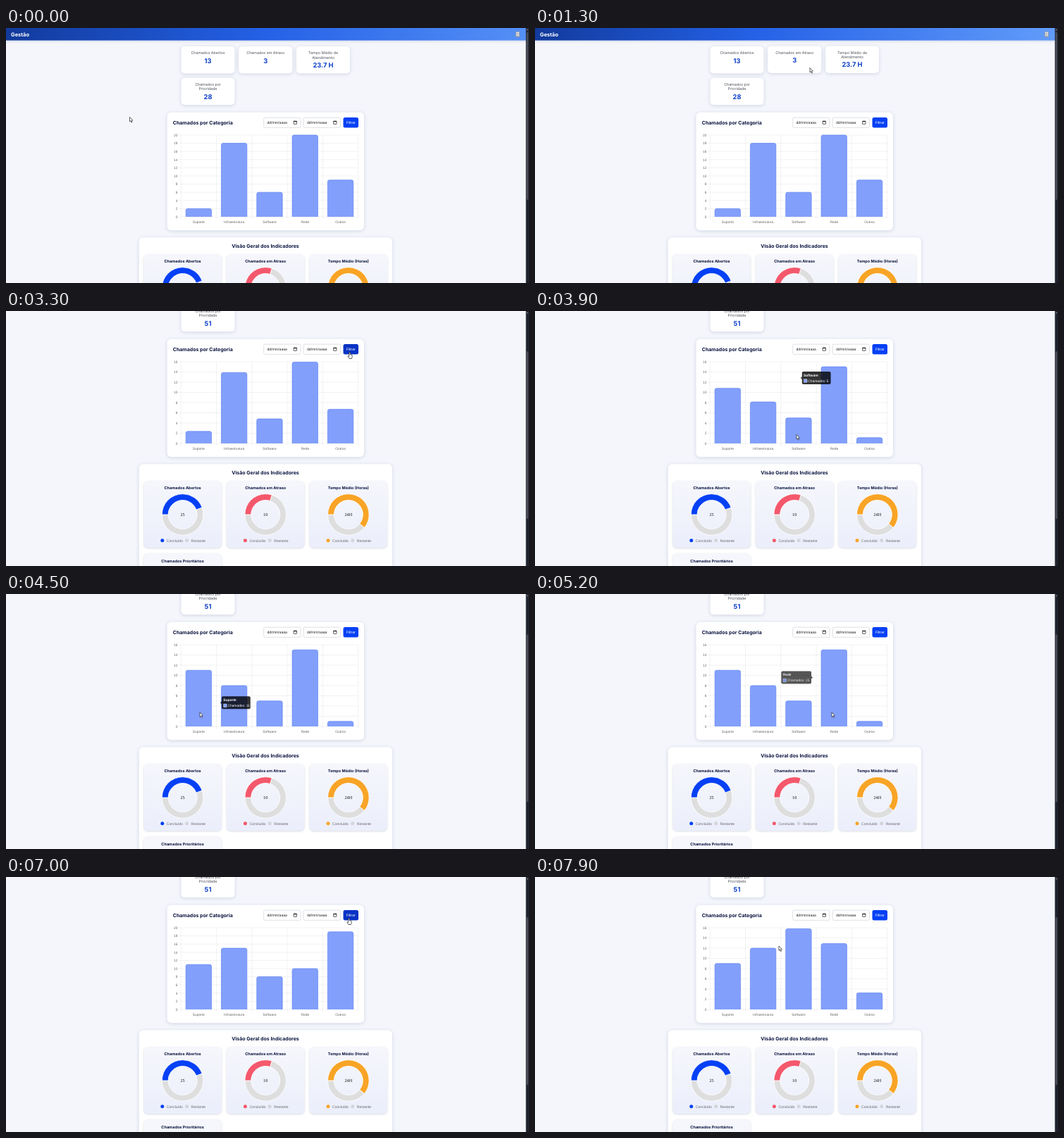
An HTML page with a canvas for the animation above (8 s loop, 742 by 362 pixels).

```html
<!DOCTYPE html>
<html lang="pt-BR">
<head>
<meta charset="utf-8">
<title>Gestão</title>
<style>
html, body { margin: 0; width: 742px; height: 362px; overflow: hidden; background: #f4f6fc; }
canvas { display: block; }
</style>
</head>
<body>
<canvas id="stage" width="742" height="362"></canvas>
<script>
const ctx = document.getElementById('stage').getContext('2d');
ctx.textRendering = 'geometricPrecision';

const LOOP = 8000;
const INTER = 'Inter, "Open Sans", sans-serif';
const ARIAL = '"Liberation Sans", Arial, sans-serif';
const SERIF = '"Liberation Serif", Times, serif';
const NAVY = '#0b1540', BLUE = '#0540f5';

// Chart: plot area in page coordinates and the data after each refresh
const PLOT = { x: 248.2, top: 152, base: 268, step: 50.3 };
const CATEGORIES = ['Suporte', 'Infraestrutura', 'Software', 'Rede', 'Outros'];
const UPDATES = [
  { at: -9999, max: 20, values: [2, 18, 6, 20, 9] },
  { at: 3280, max: 16, values: [11, 8, 5, 15, 1] },
  { at: 6100, max: 20, values: [11, 15, 8, 10, 19] },
  { at: 7280, max: 16, values: [9, 12, 16, 13, 3] }
];

// Tooltip moves: start time, bar, from and to (box left, centre y), caret side, first opacity
const TIPS = [
  { at: 3880, bar: 2, from: [379, 77], to: [378, 170], alpha: 1 },
  { at: 4150, bar: 1, from: [378, 170], to: [327, 159], alpha: 1 },
  { at: 4450, bar: 0, from: [327, 159], to: [277, 148], alpha: 1 },
  { at: 4800, bar: 1, from: [277, 148], to: [327, 159], alpha: 1 },
  { at: 5148, bar: 3, from: [327, 107], to: [378.5, 133.7], right: true, alpha: .7 },
  { at: 5460 }
];

const PATH = [
  [0, 175.5, 126.5], [150, 175.5, 126.5], [600, 330, 70], [950, 508, 46], [1300, 390, 56.5],
  [1600, 300, 58], [1900, 290, 90], [2400, 262.8, 111], [2750, 265, 112], [3150, 487, 58.5],
  [3400, 487, 58.5], [3900, 371, 175.5], [4500, 275, 168], [4700, 278, 168], [5200, 421, 168],
  [5450, 450, 150], [5850, 486, 58.5], [7350, 486, 58.5], [7880, 346, 98], [8000, 346, 98]
];

const CARDS = [
  { x: 248.5, y: 26, label: ['Chamados Abertos'], value: '13' },
  { x: 330.2, y: 26, label: ['Chamados em Atraso'], value: '3' },
  { x: 412, y: 26, label: ['Tempo Médio de', 'Atendimento'], value: '23.7 H' },
  { x: 248.5, y: 70.7, label: ['Chamados por', 'Prioridade'] }
];

const RINGS = [
  { title: 'Chamados Abertos', color: BLUE, sweep: 160, value: '25' },
  { title: 'Chamados em Atraso', color: '#f4586c', sweep: 108, value: '10' },
  { title: 'Tempo Médio (Horas)', color: '#f8a426', sweep: 219, value: '24H' }
];

const clamp = v => Math.max(0, Math.min(1, v));
const mix = (a, b, k) => a + (b - a) * k;
const smooth = k => k * k * (3 - 2 * k);
const outQuart = k => 1 - (1 - clamp(k)) ** 4;
const latest = (list, t) => list.filter(item => item.at <= t).length - 1;

function pointer(t) {
  t = Math.max(0, t);
  let i = 0;
  while (i < PATH.length - 2 && PATH[i + 1][0] <= t) i++;
  const [a, b] = [PATH[i], PATH[i + 1]];
  const k = smooth(clamp((t - a[0]) / (b[0] - a[0])));
  return [mix(a[1], b[1], k), mix(a[2], b[2], k)];
}

const scrollAt = t => 80 * smooth(clamp((t - 1980) / 340));

function inside([px, py], x, y, w, h) {
  return px >= x && px <= x + w && py >= y && py <= y + h;
}

// `y` is the middle of the capital letters
function text(str, x, y, size, { font = INTER, weight = 400, color = NAVY, align = 'center' } = {}) {
  ctx.font = `${weight} ${size}px ${font}`;
  ctx.fillStyle = color;
  ctx.textAlign = align;
  ctx.fillText(str, x, y + size * .36);
}

function box(x, y, w, h, r, fill, stroke, line = .6) {
  ctx.beginPath();
  ctx.roundRect(x, y, w, h, r);
  if (fill) { ctx.fillStyle = fill; ctx.fill(); }
  if (stroke) { ctx.strokeStyle = stroke; ctx.lineWidth = line; ctx.stroke(); }
}

function panel(x, y, w, h, r, fill = '#fff', blur = 5) {
  ctx.save();
  ctx.shadowColor = 'rgba(20,30,80,.16)';
  ctx.shadowBlur = blur;
  ctx.shadowOffsetY = 1;
  box(x, y, w, h, r, fill);
  ctx.restore();
}

function dot(x, y, r, color) {
  ctx.beginPath();
  ctx.arc(x, y, r, 0, 7);
  ctx.fillStyle = color;
  ctx.fill();
}

function segment(x1, y1, x2, y2, color, width = .6) {
  ctx.beginPath();
  ctx.moveTo(x1, y1);
  ctx.lineTo(x2, y2);
  ctx.strokeStyle = color;
  ctx.lineWidth = width;
  ctx.stroke();
}

function shape(points, fill, stroke, width = .7) {
  ctx.beginPath();
  points.forEach(([x, y]) => ctx.lineTo(x, y));
  ctx.closePath();
  ctx.fillStyle = fill;
  ctx.fill();
  if (!stroke) return;
  ctx.strokeStyle = stroke;
  ctx.lineWidth = width;
  ctx.lineJoin = 'round';
  ctx.stroke();
}

function header(t) {
  const k = clamp(t / 900);
  const g = ctx.createLinearGradient(0, 0, 738, 0);
  g.addColorStop(0, '#123a9c');
  g.addColorStop(mix(.5, .42, k), '#2461e6');
  g.addColorStop(1, k < 1 ? '#5590f6' : '#629cfa');
  ctx.save();
  ctx.shadowColor = 'rgba(30,60,160,.25)';
  ctx.shadowBlur = 4;
  ctx.fillStyle = g;
  ctx.fillRect(0, 0, 738, 17.6);
  ctx.restore();
  text('Gestão', 7, 8.8, 7.5, { weight: 700, color: '#fff', align: 'left' });
  box(723.3, 5.2, 5.2, 7.2, .5, '#f5f5f5', '#5c6270', .5);
  for (let y = 7; y < 12; y += 1.5) segment(724.3, y, 727.5, y, '#777', .6);
}

// Share of the last 200 ms the pointer spent over the card
function lift(card, t) {
  let n = 0;
  for (let i = 0; i < 10; i++) {
    const p = pointer(t - i * 20);
    p[1] += scrollAt(t - i * 20);
    if (inside(p, card.x, card.y, 76, 38.5)) n++;
  }
  return n * .12;
}

function card(c, t) {
  const y = c.y - lift(c, t), mid = c.x + 38, extra = c.label.length - 1;
  panel(c.x, y, 76, 38.5, 5);
  c.label.forEach((s, i) => text(s, mid, y + 9.3 + i * 6.5, 5.3, { color: '#4b4f58' }));
  text(c.value || (t < 3280 ? '28' : '51'), mid, y + 20.3 + extra * 6.3, 9.3, { weight: 700, color: '#0c3fc8' });
}

function dateField(x) {
  box(x, 127.2, 52.3, 14.2, 2, '#fff', '#c9ccd4');
  text('dd/mm/aaaa', x + 4.7, 134.3, 5.15, { font: ARIAL, color: '#222', align: 'left' });
  box(x + 42.4, 132.2, 4.4, 4.2, .4, null, '#222', .7);
  segment(x + 42.4, 132.6, x + 46.8, 132.6, '#222', 1.2);
}

function chart(t, overButton) {
  panel(228.5, 119.7, 279.5, 167.5, 6);
  text('Chamados por Categoria', 236.7, 134.3, 7, { weight: 700, align: 'left' });
  dateField(365.7);
  dateField(422.2);
  box(478.5, 127, 21.5, 14.6, 2.5, overButton ? '#0833c4' : BLUE);
  text('Filtrar', 489.2, 134.3, 5.15, { font: ARIAL, color: '#fff' });

  const { x, top, base, step } = PLOT, right = x + step * 5, height = base - top;
  const n = latest(UPDATES, t), now = UPDATES[n], before = UPDATES[n - 1] || now;
  const k = outQuart((t - now.at) / 1000);
  const label = { font: ARIAL, color: '#666' };

  for (let v = 0; v <= now.max; v += 2) {
    const y = base - v / now.max * height;
    segment(x - 3, y, right, y, '#e4e5e8', .5);
    text(v, x - 4.8, y, 4.9, { ...label, align: 'right' });
  }
  for (let i = 0; i <= 5; i++) segment(x + i * step, top, x + i * step, base + 3, '#e4e5e8', .5);

  CATEGORIES.forEach((name, i) => {
    const mid = x + (i + .5) * step;
    const h = mix(before.values[i] / before.max, now.values[i] / now.max, k) * height;
    box(mid - 18.2, base - h, 36.4, h, [2.6, 2.6, 0, 0], '#829ffb');
    ctx.beginPath();
    ctx.moveTo(mid - 18.2, base);
    ctx.arcTo(mid - 18.2, base - h, mid, base - h, 2.6);
    ctx.arcTo(mid + 18.2, base - h, mid + 18.2, base, 2.6);
    ctx.lineTo(mid + 18.2, base);
    ctx.strokeStyle = '#5379f2';
    ctx.lineWidth = .6;
    ctx.stroke();
    text(name, mid, 274.9, 4.9, label);
  });
}

function ring(r, i) {
  const mid = 250.6 + i * 117.6;
  const g = ctx.createLinearGradient(0, 321, 0, 416);
  g.addColorStop(0, '#f6f7fc');
  g.addColorStop(1, '#ebeefb');
  panel(mid - 55.2, 321.3, 110.4, 94.7, 6, g, 3);
  text(r.title, mid, 331.5, 5.55, { weight: 700 });

  const end = Math.PI + r.sweep * Math.PI / 180;
  const arc = (from, to, color) => {
    ctx.beginPath();
    ctx.arc(mid, 369, 29.3, from, to);
    ctx.arc(mid, 369, 20.5, to, from, true);
    ctx.closePath();
    ctx.fillStyle = color;
    ctx.fill();
    ctx.strokeStyle = '#fff';
    ctx.lineWidth = .8;
    ctx.stroke();
  };
  arc(end, Math.PI * 3, '#dedede');
  arc(Math.PI, end, r.color);
  text(r.value, mid, 369, 6.2, { font: SERIF, color: '#111' });

  const legend = { font: ARIAL, color: '#666', align: 'left' };
  dot(mid - 28.8, 405.8, 2.5, r.color);
  text('Concluído', mid - 22.8, 406.2, 5.1, legend);
  dot(mid + 6, 405.8, 2.5, '#d4d5d9');
  text('Restante', mid + 12, 406.2, 5.1, legend);
}

function indicators() {
  panel(188.7, 297.2, 359.3, 260, 6);
  text('Visão Geral dos Indicadores', 368, 309.6, 7, { weight: 700 });
  RINGS.forEach(ring);
  panel(195.4, 424.3, 110.4, 94.7, 6, '#f6f7fc', 3);
  text('Chamados Prioritários', 250.6, 434.6, 5.55, { weight: 700 });
}

function tooltip(t) {
  const tip = TIPS[latest(TIPS, t)];
  if (!tip || !tip.from) return;
  const dt = t - tip.at, k = outQuart(dt / 400);
  const x = mix(tip.from[0], tip.to[0], k), y = mix(tip.from[1], tip.to[1], k);
  const value = UPDATES[1].values[tip.bar], w = tip.right ? 42.7 : 40.8;
  const edge = tip.right ? x + w : x, out = tip.right ? 2 : -2;
  ctx.save();
  ctx.globalAlpha = Math.min(1, tip.alpha + dt / 400);
  const fill = 'rgba(0,0,0,.8)';
  box(x, y - 9, w, 18, 2, fill);
  shape([[edge, y - 2], [edge + out, y], [edge, y + 2]], fill);
  const white = { font: ARIAL, color: '#fff', align: 'left' };
  text(CATEGORIES[tip.bar], x + 2.3, y - 4.3, 4.9, { ...white, weight: 700 });
  box(x + 2.6, y + 1.7, 4.6, 4.6, 0, '#829ffb', '#fff', .4);
  text('Chamados: ' + value, x + 8.4, y + 4, 4.9, white);
  ctx.restore();
}

function scrollbar(scroll) {
  ctx.fillStyle = '#20242f';
  ctx.fillRect(737.6, 0, 5, 362);
  box(738.6, 6 + scroll * .64, 2.4, 238, 1.2, '#4b4e58');
  shape([[739.8, 1.2], [741, 3.2], [738.6, 3.2]], '#8a8d95');
}

function cursor([x, y], hand) {
  ctx.save();
  ctx.translate(x, y);
  if (hand) {
    shape([[0, 0], [1.2, 0], [1.4, 3.2], [4, 4], [4.2, 6.6], [3.4, 9], [-.2, 9], [-2, 6], [-1.5, 5.2], [-.2, 6]], '#fff', '#222');
  } else {
    shape([[0, 0], [0, 6.4], [1.4, 5.2], [2.5, 7.6], [3.5, 7.1], [2.5, 4.8], [4.3, 4.6]], '#fff', '#222');
  }
  ctx.restore();
}

function draw(t) {
  const scroll = scrollAt(t), p = pointer(t);
  const overButton = inside([p[0], p[1] + scroll], 478.5, 127, 21.5, 14.6);
  ctx.fillStyle = '#f4f6fc';
  ctx.fillRect(0, 0, 742, 362);
  ctx.save();
  ctx.translate(0, -scroll);
  header(t);
  CARDS.forEach(c => card(c, t));
  chart(t, overButton);
  indicators();
  ctx.restore();
  tooltip(t);
  scrollbar(scroll);
  cursor(p, overButton);
}

const start = performance.now();
function tick() {
  draw((performance.now() - start) % LOOP);
  requestAnimationFrame(tick);
}
tick();
</script>
</body>
</html>
```
